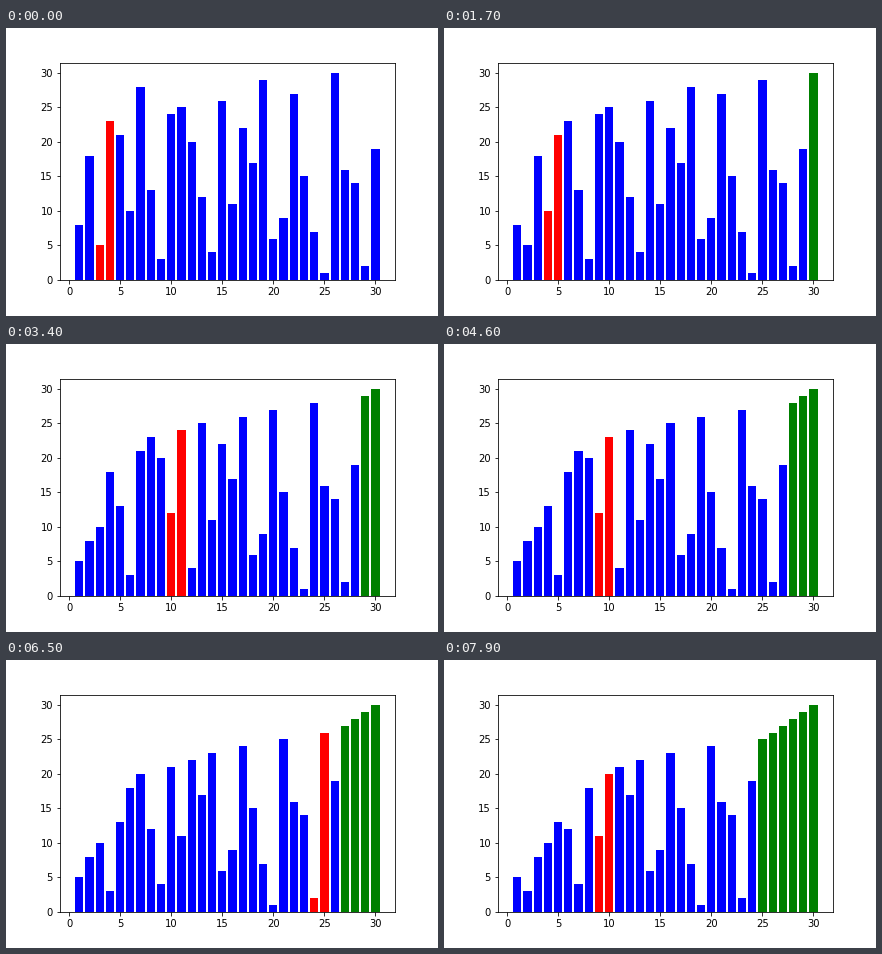
A matplotlib script that plays this animation: 432x288 px, repeating every 8 s.

```python
from itertools import islice

import matplotlib.pyplot as plt
from matplotlib.animation import FuncAnimation

FRAMES = 80
INTERVAL = 100
# the one data set of the chart; every later state comes from sorting it
START = [8, 18, 23, 5, 21, 10, 28, 13, 3, 24, 25, 20, 12, 4, 26,
         11, 22, 17, 29, 6, 9, 27, 15, 7, 1, 30, 16, 14, 2, 19]


def bubble_sort(values):
    """Yield (values, swapped pair, sorted-from index) after each swap and pass."""
    a = list(values)
    for end in range(len(a), 1, -1):
        for i in range(end - 1):
            if a[i] > a[i + 1]:
                a[i], a[i + 1] = a[i + 1], a[i]
                yield a[:], (i, i + 1), end
        yield a[:], (), end - 1


def step_at(frame):
    # three sorting steps for every two frames
    return (3 * frame + 1) // 2


def bar_color(i, pair, done):
    if i in pair:
        return "red"
    return "green" if i >= done else "blue"


steps = list(islice(bubble_sort(START), step_at(FRAMES - 1) + 1))

fig, ax = plt.subplots(figsize=(6, 4), dpi=72, facecolor="white")
fig.subplots_adjust(left=0.125, right=0.9, bottom=0.125, top=0.88)
bars = ax.bar(range(1, len(START) + 1), START, width=0.8)


def draw(frame):
    values, pair, done = steps[step_at(frame)]
    for i, (bar, value) in enumerate(zip(bars, values)):
        bar.set_height(value)
        bar.set_facecolor(bar_color(i, pair, done))
    return bars.patches


anim = FuncAnimation(fig, draw, frames=FRAMES, init_func=lambda: draw(0),
                     interval=INTERVAL, repeat=True, repeat_delay=0)
plt.show()
```
